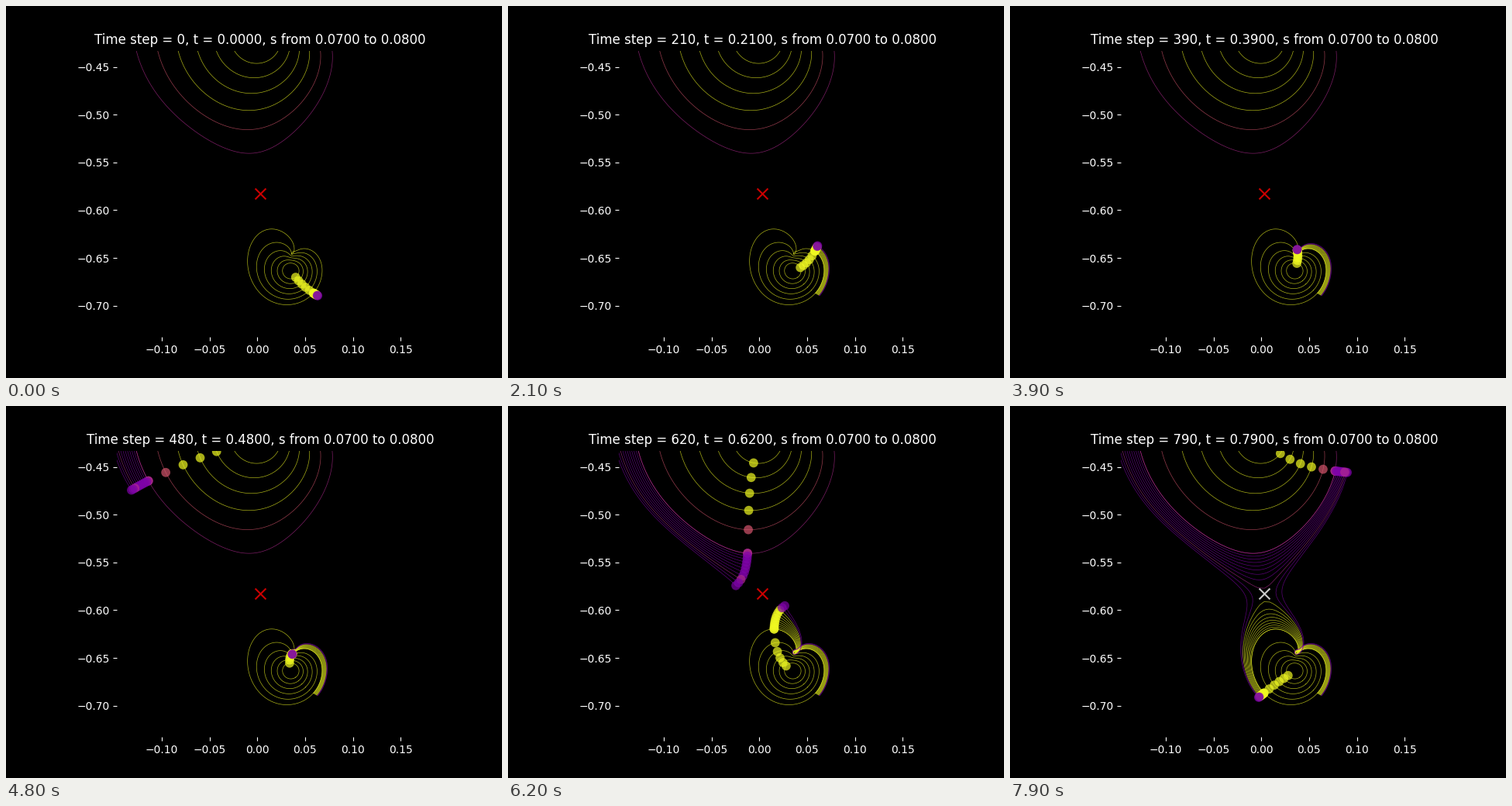
A matplotlib script that plays this animation: 640x480 px, repeating every 8000 ms.

```python
import numpy as np
import matplotlib.pyplot as plt
from matplotlib.animation import FuncAnimation

# Two roots z(w), w = s * exp(2 pi i t), that meet at one branch point:
#   z = a(w) + d |w|^2 -/+ b(w) * sqrt(1 - w / W_CRIT)
S_CRIT, T_CRIT = 0.07823, 0.6268
W_CRIT = S_CRIT * np.exp(2j * np.pi * T_CRIT)
SADDLE = 0.0030 - 0.5829j
HALF, PX = 0.15, 1232
MID = 328 + 242.4j
FRAMES, STEP = 80, 10
LOWER, UPPER = -1, 1
DEG_A, DEG_B = 6, 3

# Key points in stage pixels (x + yj) by t: the lower loop at s = 0.07,
# and the upper root at s = 0.07 and closer in.
LOOP = {0: 397.5 + 370.5j, 0.1: 408 + 345j, 0.21: 395 + 317j,
        0.272: 382 + 312.5j, 0.39: 371 + 317j, 0.48: 369 + 319.7j,
        0.62: 343 + 289j, 0.7: 311.5 + 332j, 0.79: 328 + 370j,
        0.89: 364 + 385j}
ARC = {0.48: 184 + 97j, 0.62: 309 + 191j, 0.7: 390 + 144j, 0.79: 419 + 84j}
INNER = {0.48: (0.04, 251 + 66j), 0.62: (0.02, 317 + 73j),
         0.79: (0.02, 348 + 61j)}
CENTRE = 368.3 + 341.8j


def basis(s, t, sheet):
    w = s * np.exp(2j * np.pi * np.asarray(t))
    u = w / 0.08
    root = sheet * np.sqrt(1 - w / W_CRIT)
    cols = [u ** k for k in range(DEG_A + 1)]
    cols += [root * u ** k for k in range(DEG_B + 1)]
    cols.append(abs(u) ** 2 + 0j)
    return np.stack(cols, -1)


def fit():
    keys = [(LOWER, 0.07, t, p) for t, p in LOOP.items()]
    keys += [(UPPER, 0.07, t, p) for t, p in ARC.items()]
    keys += [(UPPER, s, t, p) for t, (s, p) in INNER.items()]
    keys += [(LOWER, 0, 0, CENTRE), (UPPER, S_CRIT, T_CRIT, MID)]
    rows = [basis(s, t, sheet) for sheet, s, t, _ in keys]
    goal = [np.conj(p - MID) for *_, p in keys]
    damp = 0.006 * np.r_[:DEG_A + 1, :DEG_B + 1, 0]
    m = np.vstack([rows, np.diag(damp)])
    return np.linalg.lstsq(m, np.r_[goal, 0 * damp], rcond=None)[0]


COEF = fit()


def path(sheet, s, t):
    """One root followed continuously in t, in data coordinates."""
    swap = np.where((s > S_CRIT) & (t > T_CRIT), -1, 1)
    z = SADDLE + basis(s, t, sheet * swap) @ COEF / PX
    if sheet == UPPER:
        z = np.where((t < 0.425) | (t > 0.85), np.nan, z)
    return z.real, z.imag


def color(sheet, s):
    if sheet == LOWER:
        level = 1.0 if s < S_CRIT else 0.25
    elif s < 0.055:
        level = 1.0
    elif s < 0.065:
        level = 0.55
    else:
        level = 0.4 if round(s, 3) in (0.07, 0.078) else 0.25
    return plt.cm.plasma(level)


fig = plt.figure(figsize=(6.4, 4.8), dpi=100, facecolor="black")
ax = fig.add_axes([143.2 / 640, 0.11, 369.6 / 640, 0.77], facecolor="black")
ax.set_xlim(SADDLE.real - HALF, SADDLE.real + HALF)
ax.set_ylim(SADDLE.imag - HALF, SADDLE.imag + HALF)
ax.set_xticks(np.arange(-2, 4) * 0.05)
ax.set_yticks(np.arange(-14, -8) * 0.05)
ax.tick_params(colors="white")
for spine in ax.spines.values():
    spine.set_visible(False)
title = ax.set_title("", color="white")

RINGS = np.arange(2, 8) * 0.01
GROUP = 0.07 + np.arange(11) * 0.001
LINE = dict(lw=0.5, alpha=0.7)
ring_t = np.linspace(0, 1, 1001)
times = np.arange(FRAMES * STEP) / 1000

tracks, trails = [], []
for levels in (RINGS, GROUP):
    for sheet in (LOWER, UPPER):
        for s in levels:
            xy, c = path(sheet, s, times), color(sheet, s)
            tracks.append((xy, c))
            if levels is RINGS:
                ax.plot(*path(sheet, s, ring_t), color=c, **LINE)
            else:
                trails.append((ax.plot([], [], color=c, **LINE)[0], xy))

cross = ax.scatter(SADDLE.real, SADDLE.imag, marker="x", s=100, c="red",
                   alpha=0.8, zorder=3)
places = np.array([xy for xy, _ in tracks])
dots = ax.scatter(*np.zeros((2, len(tracks))), s=72, alpha=0.7, linewidths=0,
                  c=[c for _, c in tracks], zorder=4)


def draw(i):
    n = i * STEP
    t = n / 1000
    title.set_text(f"Time step = {n}, t = {t:.4f}, s from 0.0700 to 0.0800")
    for line, (x, y) in trails:
        line.set_data(x[:n + 1], y[:n + 1])
    dots.set_offsets(np.ma.masked_invalid(places[:, :, n]))
    cross.set_color("white" if t > T_CRIT else "red")
    return []


anim = FuncAnimation(fig, draw, frames=FRAMES, interval=100, repeat=True,
                     repeat_delay=0, init_func=lambda: [])
plt.show()
```
